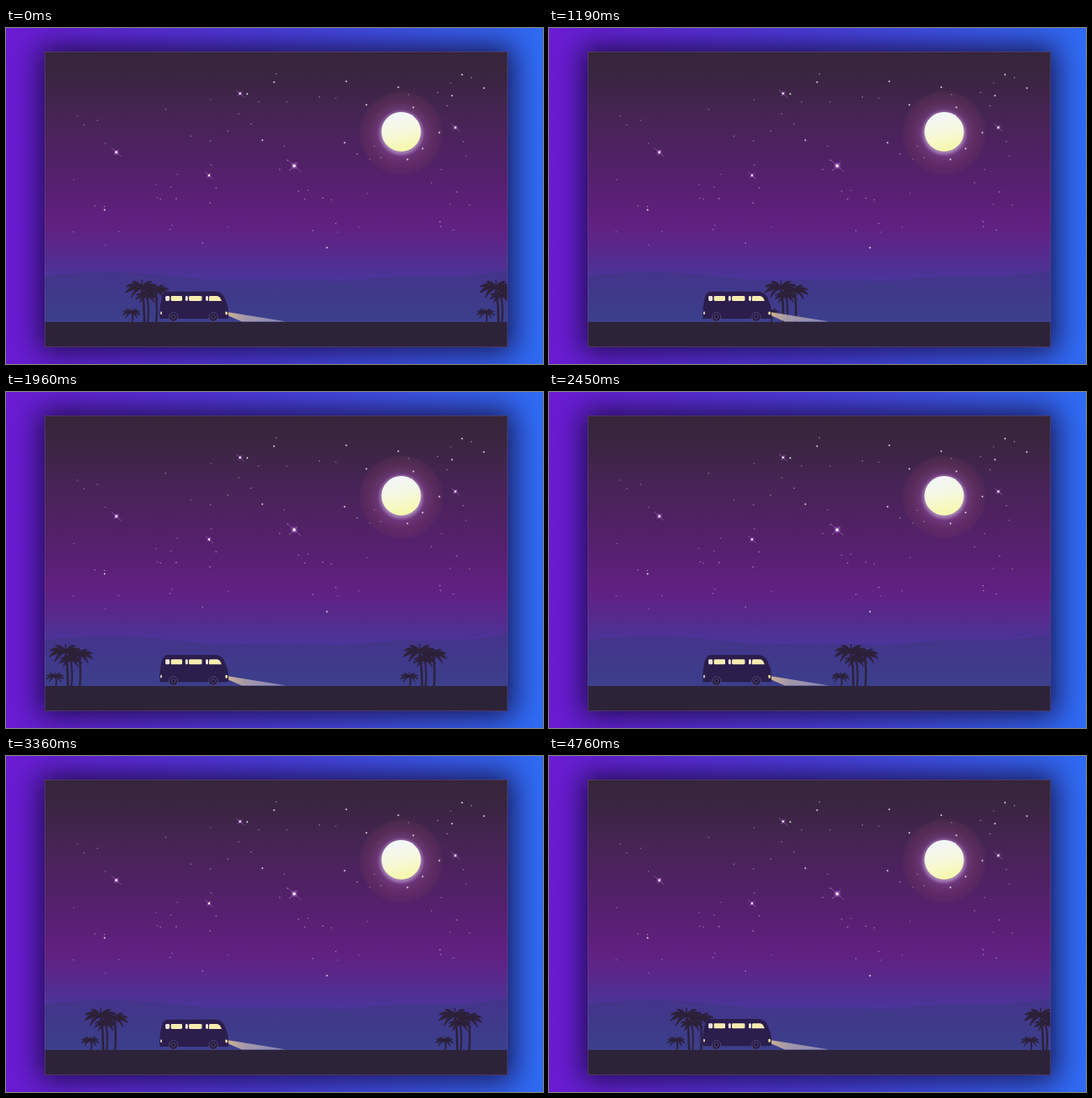
Write an HTML page that moves like this. It is 640 px wide and 400 px high and loops after 4.83 s.

```html
<!DOCTYPE html>
<html lang="en">
<head>
<meta charset="utf-8">
<title>Night drive</title>
<style>
  html, body { margin: 0; width: 100%; height: 100%; overflow: hidden; }
  body { background: linear-gradient(90deg, #6c1bd3, #4b3fe0 50%, #2f6cf4); }
  .card {
    position: absolute; left: 46px; top: 28px; width: 552px; height: 352px;
    box-shadow: 0 0 32px 6px rgba(18, 8, 50, .85);
  }
  svg { display: block; }
</style>
</head>
<body>
<div class="card">
<svg width="552" height="352" viewBox="46 28 552 352">
  <defs>
    <linearGradient id="sky" gradientUnits="userSpaceOnUse" x1="0" y1="28" x2="0" y2="302">
      <stop offset="0" stop-color="#35253a"/>
      <stop offset=".1" stop-color="#39253f"/>
      <stop offset=".3" stop-color="#472456"/>
      <stop offset=".55" stop-color="#55206c"/>
      <stop offset=".75" stop-color="#612081"/>
      <stop offset=".87" stop-color="#57298c"/>
      <stop offset="1" stop-color="#4a369b"/>
    </linearGradient>
    <linearGradient id="hill" x2="0" y2="1">
      <stop offset="0" stop-color="#44338a"/>
      <stop offset="1" stop-color="#3b408b"/>
    </linearGradient>
    <linearGradient id="moon" x1=".4" x2=".6" y2="1">
      <stop offset="0" stop-color="#f2f5fb"/>
      <stop offset=".45" stop-color="#f5f8e0"/>
      <stop offset="1" stop-color="#f7f8a8"/>
    </linearGradient>
    <radialGradient id="halo">
      <stop offset=".46" stop-color="#c09ad0" stop-opacity=".75"/>
      <stop offset=".56" stop-color="#8a4a92" stop-opacity=".5"/>
      <stop offset=".75" stop-color="#86406a" stop-opacity=".3"/>
      <stop offset=".92" stop-color="#7a3a60" stop-opacity=".22"/>
      <stop offset="1" stop-color="#7a3a60" stop-opacity="0"/>
    </radialGradient>
    <linearGradient id="beam">
      <stop offset="0" stop-color="#dfbd94"/>
      <stop offset=".3" stop-color="#b0a3ad"/>
      <stop offset="1" stop-color="#938dbb"/>
    </linearGradient>
    <g id="crown"></g>
    <g id="grove" fill="#2d2139" stroke="#2d2139"></g>
  </defs>

  <rect x="46" y="28" width="552" height="352" fill="url(#sky)"/>
  <circle cx="471" cy="125" r="51" fill="url(#halo)"/>
  <circle cx="471" cy="123.5" r="23.5" fill="url(#moon)"/>
  <g id="stars" fill="#fff"></g>

  <path fill="url(#hill)" d="M46 296C72 291 130 289 175 293S235 301 285 300S345 300 385 301S440 296 475 296S560 298 598 287V351H46Z"/>
  <g id="trees"><use href="#grove"/><use href="#grove" x="422"/></g>
  <rect x="46" y="350" width="552" height="30" fill="#2d2339"/>

  <path fill="url(#beam)" opacity=".9" d="M263 338L334 349.5H281L264 342Z"/>
  <g id="van">
    <path fill="#2b1d4c" d="M192 313.8H249Q256 314 259.5 319L264 330Q265.3 335 265 346H183.5Q182.5 334 185 324Q186.5 314.5 192 313.8Z"/>
    <g id="panes"></g>
    <path fill="#f6ecb0" d="M243 319H252Q255.5 320 257 325H242V320Z"/>
    <rect x="184" y="337.5" width="1.8" height="3.6" rx=".9" fill="#e9d5c0"/>
    <ellipse cx="262.7" cy="339.5" rx="1.4" ry="2.1" fill="#fff2a4"/>
  </g>
  <g id="wheels" fill="#251a3c" stroke="#51457a"></g>
  <rect x="46.5" y="28.5" width="551" height="351" fill="none" stroke="#6a4a86" opacity=".5"/>
</svg>
</div>
<script>
const $ = id => document.getElementById(id);
const { sin, cos, PI, floor } = Math;

function add(id, tag, attrs) {
  const el = document.createElementNS('http://www.w3.org/2000/svg', tag);
  for (const k in attrs) el.setAttribute(k, attrs[k]);
  $(id).append(el);
}

// Stars: faint ones scattered, the few bright ones placed
let seed = 7;
const random = () => (seed = seed * 16807 % 2147483647) / 2147483647;
const star = (cx, cy, r, opacity) => add('stars', 'circle', { cx, cy, r, opacity });

for (let i = 0; i < 70; i++) {
  star(80 + 495 * random(), 54 + 205 * random(), .8, .25 + .25 * random());
}
const bright = [
  [319, 64], [405, 63], [467, 70], [543, 55], [569, 71], [531, 80], [429, 91], [485, 94],
  [403, 136], [305, 133], [516, 124], [496, 143], [478, 156], [287, 78], [117, 216], [382, 261]
];
for (const [x, y] of bright) star(x + .5, y + .5, 1, .85);

function sparkle(x, y, r) {
  const ray = (a, b) => `M${x - a} ${y - b}L${x + a} ${y + b}`;
  add('stars', 'circle', { cx: x, cy: y, r: r * .5, fill: '#b45fd6', opacity: .4 });
  add('stars', 'path', {
    d: ray(r, r * .9) + ray(r * .5, -r * .55),
    stroke: '#b672cf', 'stroke-width': .8, opacity: .65
  });
  star(x, y, r * .23, 1);
}
sparkle(131.5, 148, 6);
sparkle(279, 78, 5);
sparkle(343.5, 164, 8);
sparkle(242, 175.5, 5);
sparkle(535.5, 118.5, 5);

// Palms: a fan of thin drooping fronds on a bent trunk
for (let i = -4; i <= 4; i++) {
  const a = i * 35 * PI / 180, x = 20 * sin(a), y = 4 - 12 * cos(a);
  add('crown', 'path', {
    d: `M0 -1Q${x * .7} ${y * .4 - 6} ${x} ${y}Q${x * .5} ${y * .4 - 1} 0 2Z`
  });
}
function palm(x, y, foot, size) {
  add('grove', 'use', { href: '#crown', transform: `translate(${x} ${y}) scale(${size})` });
  add('grove', 'path', {
    d: `M${x} ${y}Q${x + 3} ${(y + 350) / 2} ${foot} 351`,
    fill: 'none', 'stroke-width': 1 + 1.6 * size
  });
}
palm(24, 308, 27, 1);
palm(40, 311.5, 41, .85);
palm(30, 318, 31, .7);
palm(11.5, 338, 12, .55);

// Van details
function pane(x, width, fill) {
  add('panes', 'rect', { x, y: 319, width, height: 6, rx: 1.4, fill });
}
for (const x of [190, 213.8, 238]) pane(x, x < 200 ? 5 : 3, '#f0e2dc');
for (const x of [196.5, 218]) pane(x, x < 200 ? 13.5 : 15.5, '#f6ecb0');
for (const cx of [199.5, 247]) {
  for (const r of [5.2, 2.5]) add('wheels', 'circle', { cx, cy: 344, r });
}

// Motion: the groves pass three times per loop at a gently varying speed
const STEP = 70, STEPS = 69, GAP = 422;

function draw(ms) {
  const n = floor(ms / STEP) % STEPS;
  const p = n / (STEPS - 1);
  const x = 560 - 1264 * p + 5 * (sin(PI * p) + sin(2 * PI * p));
  const wrapped = ((x + 60) % GAP + GAP) % GAP - 60;
  $('trees').setAttribute('transform', `translate(${wrapped.toFixed(2)} 0)`);
  const bob = cos(n * .4) > .5 ? 0 : -.7;
  $('van').setAttribute('transform', `translate(0 ${bob})`);
}

let start;
function tick(now) {
  start ??= now;
  draw(now - start);
  requestAnimationFrame(tick);
}
draw(0);
requestAnimationFrame(tick);
</script>
</body>
</html>
```
